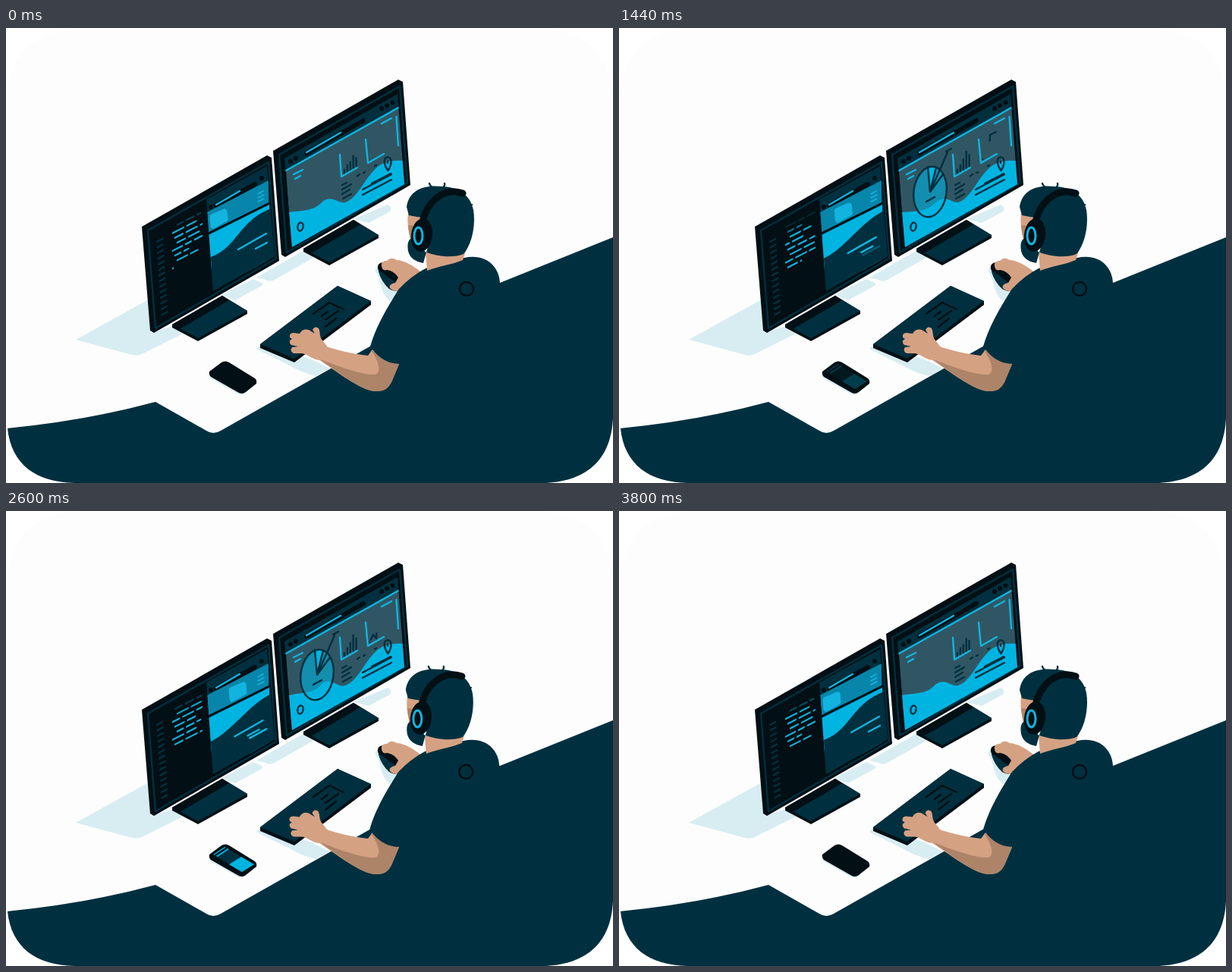
Animation, 800 px wide and 600 px high, one loop 3.84 s. Source, as an HTML page:

```html
<!DOCTYPE html>
<html lang="en">
<head>
<meta charset="utf-8">
<title>Developer at a desk</title>
<style>
  html, body { margin: 0; width: 100%; height: 100%; overflow: hidden; background: #fff; }
  svg { display: block; width: 800px; height: 600px; }
  .navy { fill: #00303f; }
  .black { fill: #020f14; }
  .cyan { fill: #00b4e2; }
  .blue { fill: #0885aa; }
  .skin { fill: #d5a183; }
  .shade { fill: #ae8469; }
  .shadow { fill: #d7edf2; }
  .line { fill: none; stroke: #12b4df; stroke-width: 2.4; stroke-linecap: round; stroke-linejoin: round; }
  .ink { stroke: #00303f; }
  .jet { stroke: #020f14; }
  .wide { stroke-width: 6; }
</style>
</head>
<body>
<svg viewBox="0 0 800 600">
  <defs>
    <clipPath id="stage"><path id="card" d="M0 90C8 30 40 4 95 0H705C760 4 795 30 800 90V515C797 570 765 597 712 600H90C40 599 7 576 2 528Z"/></clipPath>
    <clipPath id="panel"><path d="M264 226L344 182L354 301L273 347Z"/></clipPath>
    <clipPath id="board"><path d="M367 172L516 87L525 206L377 289Z"/></clipPath>
    <g id="monitor">
      <path class="black" d="M219 391L285 353L318 373V377L253 413L219 395Z"/>
      <path class="navy" d="M219 391L285 353L318 373L253 409Z"/>
      <path class="black" d="M219 391L285 353L294 359L229 397Z"/>
      <path class="black" d="M179 262L344 168L350 171L360 307L195 402L190 399Z"/>
      <path class="line ink" d="M187 267L346 177L356 304L197 396Z"/>
    </g>
  </defs>
  <use href="#card" fill="#fdfdfd"/>
  <g clip-path="url(#stage)">
    <path class="navy" d="M0 528Q105 518 197 493L264 531Q273 537 283 531L520 397L651 336L800 276V600H0Z"/>
  </g>

  <g class="shadow">
    <path d="M92 411L188 358L191 402L220 393L235 402L181 429Q174 433 166 431Z"/>
    <path d="M284 352L326 331L337 336Q340 339 335 341L302 359ZM330 329L395 292L410 300L354 332Q347 335 342 332ZM458 252L503 233Q510 237 506 242L478 257Z"/>
    <path d="M330 423L336 417L400 436L427 449L408 459Q388 454 372 444L335 426Z"/>
    <path d="M268 458L290 460L329 468L315 482Q310 485 305 482L269 462Z"/>
    <path d="M491 314Q485 316 488 323C496 336 492 348 506 360L526 343Z"/>
  </g>

  <use href="#monitor"/>
  <use href="#monitor" x="173" y="-100"/>

  <!-- left screen -->
  <path id="sidebar" class="line ink"/>
  <g id="code" transform="translate(220 317) skewY(-27)"></g>
  <g clip-path="url(#panel)">
    <path class="navy" d="M264 226L344 182L354 301L273 347Z"/>
    <path class="line jet wide" d="M277 234L328 206M270 236V236.100M337 198V198.100"/>
    <path class="line" d="M277 233L308 215"/>
    <path class="blue" d="M265 243L346 201V230L267 270Z"/>
    <path id="tile" class="line" style="fill:#12b4df;stroke-width:7" d="M272 249L288 242L289 252L273 261Z"/>
    <path class="line" style="stroke-width:1.600" d="M332 219L339 215M332 224L340 220M332 229L340 225"/>
    <path class="line jet" d="M266 271L347 231"/>
    <path class="cyan" d="M267 273L347 233V320H270Z"/>
    <path id="hill" class="navy"/>
    <path id="text" class="line"/>
    <path id="extra" class="line"/>
  </g>

  <!-- right screen -->
  <g clip-path="url(#board)">
    <path class="navy" d="M366 171L518 85V108L368 190Z"/>
    <path fill="#305664" d="M369 188L518 104L526 206L376 290Z"/>
    <path class="line jet wide" d="M396 165L471 122M375 175.500V176M382 171.500V172M495 106V106.500M502 102V102.500M509.500 98V98.500"/>
    <path class="line" d="M396 164L441 138M369 188L519 104"/>
    <path id="wave" class="cyan"/>
    <path class="line" d="M379 193L391 187M381 199L388 195M495 126L508 119M514.500 117L517 155M440 167L442 196L463 184M474 147L477 178L498 166"/>
    <path class="line ink" d="M443 207L449 204M443 213L455 206M443 219L453 213M444 225L455 219M463 195L466 193M471 191L473 190M486 182L488 181"/>
    <path class="line ink" d="M482 205L507 192M470 213L508 193M470 220L508 200"/>
    <path id="bars" class="line ink"/>
    <path id="trend" class="line ink" pathLength="1" d="M479 173L484 163L488 168L489 141L497 137"/>
    <ellipse class="line ink" cx="388" cy="262" rx="3.600" ry="5.500" transform="rotate(12 388 262)"/>
    <path class="line ink" d="M503.500 188C498 181 497 172 502 170.500C508 169 510 178 503.500 188ZM503 176V178"/>
    <g id="pie">
      <ellipse class="cyan" opacity=".6" cx="410" cy="216" rx="21.500" ry="33.500" transform="rotate(8 410 216)"/>
      <path class="cyan" d="M410 216L407 183Q413 181 418 184Z"/>
      <ellipse class="line ink" cx="410" cy="216" rx="21.500" ry="33.500" transform="rotate(8 410 216)"/>
      <path class="line ink" d="M407 183L410 216L418 184M410 216L427 193M405 229L416 223"/>
    </g>
    <path id="callout" class="line ink" pathLength="1" d="M411 214L433 164L431 163L438 159"/>
  </g>

  <!-- keyboard and phone -->
  <path class="black" d="M335 417L437 340L481 360V365L380 441L335 422Z"/>
  <path class="navy" d="M335 417L437 340L481 360L380 436Z"/>
  <path class="line jet" d="M405 377L426 362L445 371M416 380L424 374M421 385L438 373M421 394L435 383"/>
  <path class="black" d="M268 453L284 441Q289 438 294 441L328 462Q331 464 330 469L316 480Q311 484 305 480L270 460Q267 457 268 453Z"/>
  <g id="phone">
    <path class="navy" d="M273 453L288 443L327 466L311 476Z"/>
    <path class="cyan" d="M273 453L288 443L294 446L279 456ZM294 466L310 456L327 466L311 476Z"/>
    <path class="line jet" d="M276 454L290 445"/>
  </g>

  <!-- mouse and right hand -->
  <g id="mouse">
    <path class="black" d="M490 317Q489 310 497 309L519 323L522 346Q514 349 505 344Q494 334 490 317Z"/>
    <path class="navy" d="M491 321C496 320 502 329 512 334L520 345Q512 348 506 344Q495 336 491 321Z"/>
    <path class="skin" d="M495 314Q494 307 502 307Q507 301 515 306C526 307 536 313 546 321L556 325L528 350L522 345Q513 350 506 343Q504 338 513 336L517 329Q511 320 502 319Q496 321 495 314Z"/>
  </g>

  <!-- left arm -->
  <path class="skin" d="M410 416C432 424 457 430 477 432L483 424L519 441L508 467Q502 480 488 479C468 479 435 452 410 436Z"/>
  <path class="shade" d="M518 443L481 425C492 440 495 455 486 457C468 458 433 444 414 437C440 455 468 479 488 479Q502 480 508 467Z"/>
  <path id="hand" class="skin" d="M412 438C401 436 397 429 388 429H379Q373 426 377 421L385 420L376 418Q371 413 377 410L374 408Q373 402 379 402L387 403Q391 396 399 398L407 403L404 398Q407 392 412 396C415 402 412 407 418 413L424 421Z"/>

  <!-- person -->
  <g id="person">
    <path class="navy" d="M480 420C488 392 504 366 518 344Q534 327 553 317L604 303C632 297 650 314 651 336L670 420L600 500L519 443Q496 443 480 420Z"/>
    <circle class="line jet" cx="607" cy="344" r="9"/>
    <g id="head">
      <path class="skin" d="M553 296L606 294L602 306C588 312 570 314 555 320ZM530 244L550 252L548 285L533 278Q528 262 530 244Z"/>
      <path class="shade" d="M530 260L540 261L540 278L533 280Z"/>
      <path class="navy" d="M533 278Q528 282 530 294Q533 307 550 310L557 285ZM528 236C531 214 550 206 575 209C597 210 612 220 616 240C619 258 615 284 603 298C589 304 566 301 552 295L547 250L531 247Z"/>
      <path class="line ink" d="M564 211Q559 209 558 205M575 211Q579 208 578 205M606 231Q610 235 614 233"/>
      <path class="line jet" style="stroke-width:9" d="M548 262C551 233 575 208 602 218"/>
      <ellipse class="black" cx="548" cy="273" rx="14" ry="22" transform="rotate(7 548 273)"/>
      <ellipse class="line" style="stroke-width:3" cx="543.500" cy="274" rx="5.500" ry="11"/>
    </g>
  </g>
</svg>
<script>
const LOOP = 3840, HALF = LOOP / 2, ROW = 320, ROWS = LOOP / ROW;
const $ = id => document.getElementById(id);
const put = (id, name, value) => $(id).setAttribute(name, value);
const unit = (t, from, to) => Math.min(1, Math.max(0, (t - from) / (to - from)));
const ease = (t, from, to) => { const u = unit(t, from, to); return u * u * (3 - 2 * u); };
const pulse = (t, a, b, c, d) => ease(t, a, b) - ease(t, c, d);
const mix = (a, b, u) => a + (b - a) * u;
const random = n => { const s = Math.sin(n * 12.9898) * 43758.5453; return s - Math.floor(s); };

put('sidebar', 'd', Array.from({ length: 14 }, (_, i) => `M${199 + i * .5} ${282 + i * 7.4}l7 -4`).join(''));

// Each code row is a few words with an indent.
const words = Array.from({ length: ROWS }, (_, row) => {
  const list = [];
  let x = row % 3 * 3;
  for (let k = 0; k < 2 + row % 2; k++) {
    const end = Math.min(38, x + 4 + random(row * 5 + k) * 10);
    if (end > x + 1) list.push([x, end]);
    x = end + 5;
  }
  return list;
});
const rows = Array.from({ length: 8 }, () => {
  const path = document.createElementNS('http://www.w3.org/2000/svg', 'path');
  path.setAttribute('class', 'line');
  return $('code').appendChild(path);
});

function drawCode(t) {
  const now = Math.floor(t / ROW), part = t / ROW - now;
  rows.forEach((path, age) => {
    const typed = age ? 40 : part * 40;
    const y = -7.8 * (age + ease(part, .75, 1));
    path.setAttribute('d', words[(now - age + ROWS) % ROWS]
      .filter(([start]) => start < typed)
      .map(([start, end]) => `M${start} ${y}H${Math.min(end, typed)}`).join(''));
    path.style.opacity = age === 7 ? .3 * (1 - part) : age === 6 ? 1 - .7 * part : 1;
  });
}

function drawLeft(t, half) {
  const slide = pulse(half, 300, 560, 1250, 1700);
  const bend = pulse(half, 350, 900, 1250, 1700);
  put('tile', 'transform', `translate(${25 * slide} ${-13 * slide})`);
  put('hill', 'd', `M270 ${mix(302, 305, bend)}C${mix(305, 295, bend)} ${mix(289, 290, bend)} ${
    mix(306, 321, bend)} ${mix(256, 262, bend)} 347 ${mix(239, 244, bend)}L356 310L272 350Z`);
  const dx = -7 * bend, dy = 8 * bend;
  put('text', 'd', `M${306 + dx} ${292 + dy}l37 -21M${329 - 16 * bend} ${291 + dy}l15 -8`);
  put('extra', 'd', `M${322 + dx / 7} ${300 - bend}l22 -12`);
  $('extra').style.opacity = pulse(t, 1350, 1600, 3250, 3500);
}

function drawRight(t, half) {
  const sway = 2 * Math.sin(2 * Math.PI * t / LOOP);
  put('wave', 'd', `M373 243C393 ${240 + sway} 405 242 417 ${229 + sway}C430 219 437 ${
    232 - sway} 447 230C464 225 473 196 491 182Q504 173 524 175L528 207L376 291Z`);
  const pie = pulse(t, 100, 550, 3150, 3650);
  put('pie', 'transform', `translate(410 216) scale(${pie}) translate(-410 -216)`);
  const reach = unit(t, 450, 950) - unit(t, 2800, 3300);
  put('callout', 'stroke-dasharray', `${reach} 2`);
  $('callout').style.display = reach > 0 ? '' : 'none';

  const grow = 1 + .4 * Math.sin(Math.PI * t / LOOP) ** 2;
  put('bars', 'd', [4, 8, 10, 16, 11].map((h, i) =>
    `M${446 + i * 3.9} ${191 - i * 2.2}v${-h * (i > 1 ? grow : 1)}`).join(''));

  const tail = unit(half, 600, 1820), tip = unit(half, 250, 1210);
  put('trend', 'stroke-dasharray', `0 ${tail} ${tip - tail} 2`);
  $('trend').style.display = half > 250 && half < 1830 ? '' : 'none';
}

function drawPerson(t, half) {
  const breath = Math.max(0, Math.sin(2 * Math.PI * half / HALF));
  put('person', 'transform', `translate(${-breath} 0)`);
  put('head', 'transform', `translate(${-.5 * breath} 0)`);
  const move = pulse(t, 250, 550, 750, 1050);
  put('mouse', 'transform', `translate(${4 * move} ${-move})`);
  const tap = Math.sin(2 * Math.PI * t / 240);
  put('hand', 'transform', `rotate(${tap} 416 430)`);
  $('phone').style.opacity = pulse(t, 1400, 1520, 3360, 3480);
}

function frame(time) {
  const t = time % LOOP, half = t % HALF;
  drawCode(t);
  drawLeft(t, half);
  drawRight(t, half);
  drawPerson(t, half);
  requestAnimationFrame(frame);
}
frame(performance.now());
</script>
</body>
</html>
```
